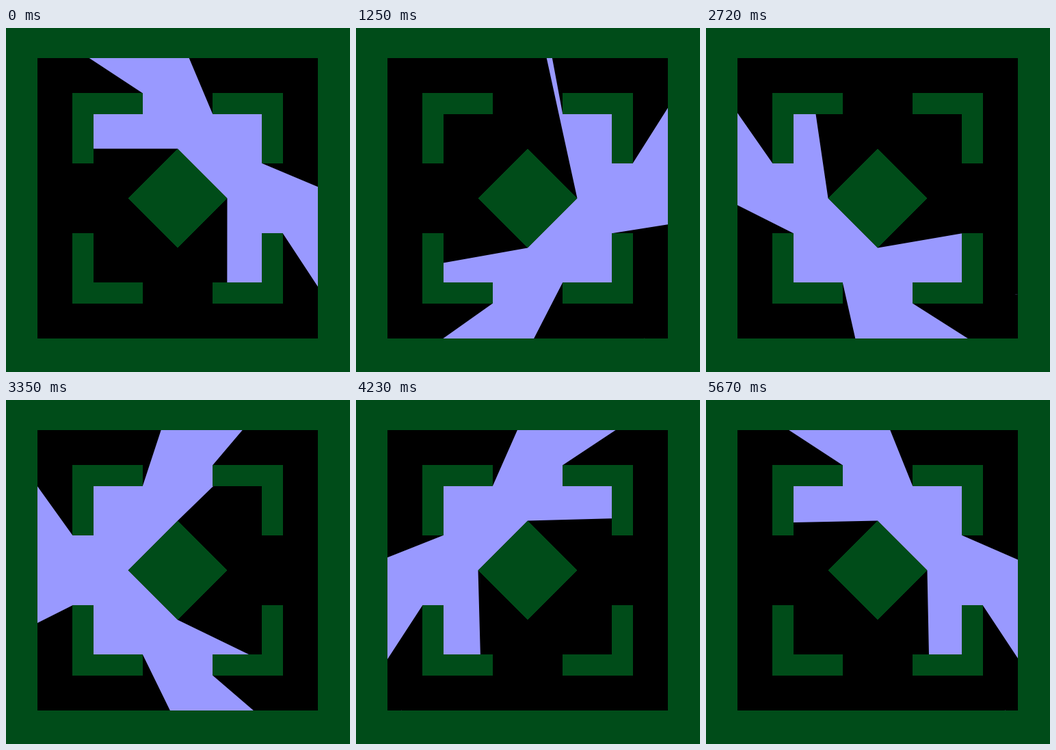
An HTML page for the animation above (5.72 s loop, 503 px wide and 503 px high).

```html
<!DOCTYPE html>
<html lang="en">
<head>
<meta charset="utf-8">
<title>Orbiting light</title>
<style>
  html, body { margin: 0; width: 100%; height: 100%; overflow: hidden; background: #004c19; }
  svg { display: block; }
</style>
</head>
<body>
<svg width="503" height="503" viewBox="0 0 503 503">
  <rect width="503" height="503" fill="#004c19"/>
  <svg x="46" y="44" width="410" height="410" viewBox="-4 -4 8 8" overflow="hidden">
    <rect x="-4" y="-4" width="8" height="8" fill="#99f"/>
    <path id="shadow" fill="#000"/>
    <path id="walls" fill="#004c19" shape-rendering="crispEdges"/>
  </svg>
</svg>
<script>
const LOOP = 5720;
const ORBIT = 2;
const START = -45;

// [time in ms, degrees travelled]; the light pauses briefly near the bottom
const TRAVEL = [
  [0, 0], [680, 43], [1870, 118], [2290, 144.4], [2439, 144.4], [2440, 153.6],
  [2720, 171], [3350, 211.3], [4230, 268.4], [5670, 358.8], [LOOP, 360]
];

const quarterTurn = points => points.map(([x, y]) => [-y, x]);

// All outlines run clockwise, in units around the room's centre
const bracket = [[-3, -3], [-1, -3], [-1, -2.4], [-2.4, -2.4], [-2.4, -1], [-3, -1]];
const diamond = [[0, -Math.SQRT2], [Math.SQRT2, 0], [0, Math.SQRT2], [-Math.SQRT2, 0]];
const obstacles = [diamond];
for (let i = 0, shape = bracket; i < 4; i++, shape = quarterTurn(shape)) obstacles.push(shape);

const outline = points => 'M' + points.map(p => p.map(v => v.toFixed(4)).join(' ')).join('L') + 'Z';

const shadow = document.getElementById('shadow');
document.getElementById('walls').setAttribute('d', obstacles.map(outline).join(''));

function travelled(t) {
  const i = TRAVEL.findIndex(([time]) => time > t);
  const [t0, a0] = TRAVEL[i - 1], [t1, a1] = TRAVEL[i];
  return a0 + (a1 - a0) * (t - t0) / (t1 - t0);
}

function castShadows([lx, ly]) {
  const project = ([x, y]) => [x + 60 * (x - lx), y + 60 * (y - ly)];
  let d = '';
  for (const shape of obstacles) {
    shape.forEach((a, i) => {
      const b = shape[(i + 1) % shape.length];
      const side = (b[0] - a[0]) * (ly - a[1]) - (b[1] - a[1]) * (lx - a[0]);
      if (side < 0) d += outline([a, b, project(b), project(a)]);
    });
  }
  return d;
}

function render(t) {
  const angle = (START + travelled(t)) * Math.PI / 180;
  shadow.setAttribute('d', castShadows([ORBIT * Math.cos(angle), ORBIT * Math.sin(angle)]));
}

const began = performance.now();
function tick() {
  render((performance.now() - began) % LOOP);
  requestAnimationFrame(tick);
}
render(0);
requestAnimationFrame(tick);
</script>
</body>
</html>
```
